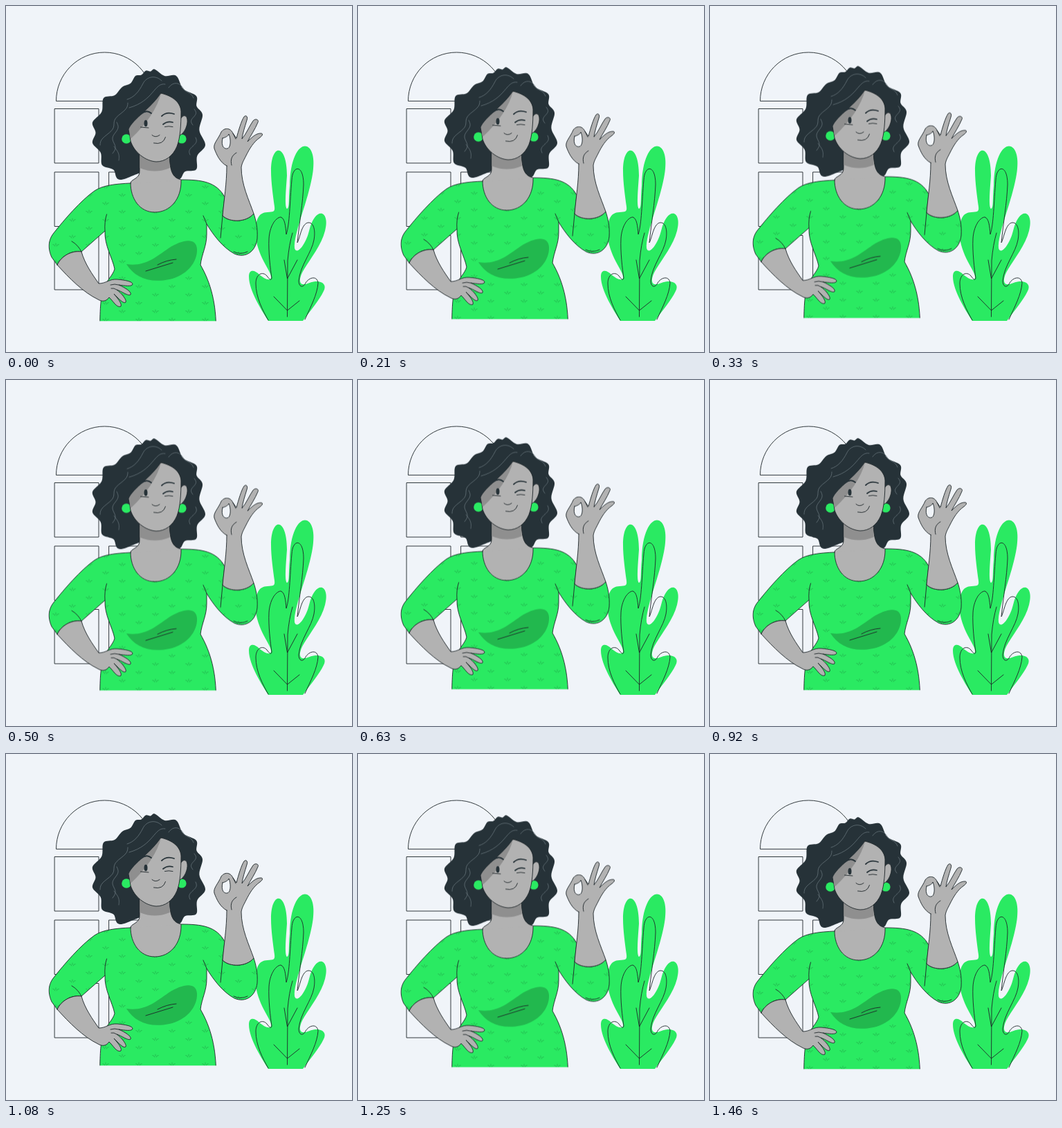
Write an HTML page that moves like this. It is 500 by 500 pixels and loops after 1.5 s.

```html
<!DOCTYPE html>
<html lang="en">
<head>
<meta charset="utf-8">
<title>Woman giving an OK sign</title>
<style>
  html, body { margin: 0; width: 100%; height: 100%; overflow: hidden; background: #f0f4f9; }
  svg { display: block; width: 100vw; height: 100vh; }
  .line, .edge { stroke: #1d2529; stroke-width: .9; stroke-linecap: round; stroke-linejoin: round; }
  .line, .strand, .brow { fill: none; }
  .skin { fill: #b2b2b2; }
  .shade { fill: #8f8f8f; }
  .green { fill: #2aea62; }
  .hair { fill: #263238; }
  .strand { stroke: #68757b; stroke-width: .8; stroke-linecap: round; }
  .brow { stroke: #263238; stroke-width: 1.8; stroke-linecap: round; }
</style>
</head>
<body>
<svg viewBox="0 0 500 500">
  <defs>
    <pattern id="sprigs" width="48" height="24" patternUnits="userSpaceOnUse">
      <path id="sprig" fill="none" stroke="#1fa648" stroke-width=".7" stroke-linecap="round"
        d="M19.800 8.500q2.500 0 3 2.500M28.200 8.500q-2.500 0-3 2.500M24 7v2.500"/>
      <use href="#sprig" x="-24" y="12"/>
      <use href="#sprig" x="24" y="12"/>
    </pattern>
    <clipPath id="hem"><path d="M0 0H500V455.300H0Z"/></clipPath>
    <path id="torso" d="M180 256C158 257 140 259 128 267C108 281 84 309 69 328C60 339 61 352 66 363L74 374
      C80 361 95 353 109 355L143 325C142 346 154 364 157 380C154 390 146 395 141 409C136 424 136 440 135.500 470
      H303.500C304 430 296 400 281 374C283 358 290 347 290 330V315C299 330 313 349 330 358C346 365 361 355 363 336
      C364 321 361 309 358 300C347 313 323 313 313 303L316 276C304 254 283 251 253 251C254 279 237 298 215 298
      C193 298 180 278 180 256Z"/>
  </defs>

  <g class="line" id="window"><path d="M72.500 137a70 70 0 0 1 140 0Z"/></g>

  <g id="plant">
    <path class="green" d="M379 455C371 442 351 412 351 391C351 380 359 381 366 388C373 394 381 398 383 393
      C385 385 365 365 361 335C359 309 365 298 378 298C386 297 389 298 388 290C386 275 383 255 383 238
      C383 198 406 198 406 245C405 262 402 290 406 293C410 292 408 280 410 260C411 188 449 188 444 235
      C442 258 431 290 425 310C421 323 416 340 417 350C420 361 433 345 438 325C447 288 469 295 461 325
      C456 345 440 365 431 380C424 391 423 400 428 402C436 403 440 398 448 398C460 398 463 405 459 412
      C453 425 440 440 429 455Z"/>
    <path class="line" d="M379 454C371 440 361 421 361 401C361 387 371 383 377 390C380 394 383 398 384 393
      C382 380 379 355 380 336C381 319 389 306 397 305C403 307 404 318 405 330C410 315 410 285 413 251
      C414 230 430 228 430 258C429 285 424 312 421 342C425 335 427 314 437 313C446 313 447 327 445 338
      C442 356 425 375 423 397C423 405 428 408 432 402C436 393 449 388 451 400C450 417 440 435 432 453"/>
    <path class="line" d="M406.500 449L407 368Q409 345 414 328M402 367L406.500 394L421 367M387 420L406.500 440L424 426"/>
  </g>

  <g id="woman">
    <path class="hair" id="mane"/>
    <g class="strand" id="strands">
      <path d="M225 108C216 99 203 102 198 112C192 124 185 132 175 135"/>
      <path d="M235 118C242 108 252 111 256 119C260 126 267 123 271 133"/>
      <path d="M230 113C214 110 214 137 178 147"/>
    </g>

    <path class="skin edge" d="M193 210V238C194 250 180 250 180 256L215 300L253 251C241 248 237 240 236 215"/>
    <path class="skin" d="M180 256C180 278 193 298 215 298S254 279 253 251Z"/>
    <path class="shade" d="M193.500 212V234Q215 243 236.500 234L235.500 214Z"/>
    <circle class="green" cx="174" cy="192" r="6.800"/>
    <circle class="green" cx="254" cy="192" r="6.600"/>
    <path class="skin edge" d="M251 166C254 157 261 156 262 164C263 172 258 184 251 187"/>
    <path class="skin edge" d="M224 126C241 130 252 139 253 152C253 171 252 190 247 203C241 217 230 225 217 225
      C201 224 185 211 180 195L177.500 178C185 162 209 149 224 126Z"/>
    <path class="shade" d="M224 126C219 147 203 171 180 192L177.500 178C185 162 209 149 224 126Z"/>
    <path class="brow" d="M195 156Q203 149 210 155M225 159Q232 152 243 156M227 171Q233 166 241 168"/>
    <ellipse class="hair" cx="202" cy="169.500" rx="2.500" ry="4.800"/>
    <path class="line" d="M194.500 175L206 176M229.500 174.500Q235 173 241 174.500M211 186.500Q216 191 222 186.500M213.500 198Q227 201 230.500 189.500"/>

    <g clip-path="url(#hem)">
      <use href="#torso" class="green"/>
      <use href="#torso" class="edge" fill="url(#sprigs)"/>
    </g>
    <path fill="#22b84e" d="M174 373C201 377 216 363 235 350C255 337 275 334 276 351C277 371 260 390 236 395
      C207 401 186 392 174 373Z"/>
    <path class="line" d="M202 383L241 371M219 374Q232 367 246 366M145.500 301Q142 312 143 325M95 340Q104 345 109 355M285 303L290 315M329 355Q339 360 349 355"/>

    <path class="skin edge" d="M74 374C80 361 95 353 109 355C114 373 125 388 134 401C145 401 149 394 161 395
      C172 396 183 398 183 402C182 406 171 404 163 403C172 407 182 413 180 417C177 420 167 412 160 410
      C167 415 175 425 173 428C170 431 163 423 156 416C161 422 168 430 166 434C160 437 154 425 149 421
      C144 428 138 427 133 424C112 414 91 393 74 374Z"/>
    <path class="line" d="M151 403Q157 401 163 403M152 408Q156 407 160 410"/>

    <path class="skin edge" d="M319 231C309 226 304 214 301 206C299 199 307 192 311 182C315 176 324 175 328 184L333 191
      C336 180 340 166 344 160C347 157 350 160 348 165C345 175 342 184 341 192C347 185 352 173 357 166
      C360 162 366 164 364 168C360 178 353 188 349 196C355 190 361 184 368 184C372 184 371 187 367 190
      C358 196 352 206 347 216C343 224 341 227 340 233C340 258 351 280 358 300C347 313 323 313 313 303
      C315 279 319 257 319 231Z"/>
    <path class="edge" fill="#f0f4f9" d="M313 191C317 190 321 188 322 185C325 192 325 203 321 205.500C316 208 310 203 313 191Z"/>
    <path class="line" d="M328 184L332 192M333 212C326 216 324 222 326 230M313 303L310 335"/>
  </g>
</svg>
<script>
  const find = id => document.getElementById(id);

  function add(parent, tag, attrs) {
    const el = document.createElementNS('http://www.w3.org/2000/svg', tag);
    for (const key in attrs) el.setAttribute(key, attrs[key]);
    find(parent).append(el);
  }

  // Closed curve passing smoothly through every point
  function smooth(points) {
    const n = points.length;
    const at = i => points[(i + n) % n];
    const handle = (i, dir) => [0, 1].map(k => at(i)[k] + dir * (at(i + 1)[k] - at(i - 1)[k]) / 6);
    return 'M' + at(0) + points.map((p, i) =>
      `C${handle(i, 1)} ${handle(i + 1, -1)} ${at(i + 1)}`).join('') + 'Z';
  }

  // Curls: a dip between neighbouring crests, as deep as they are far apart
  function curls(crests, depth) {
    return crests.flatMap(([x, y], i) => {
      const [u, v] = crests[(i + 1) % crests.length];
      return [[x, y], [(x + u) / 2 - depth * (v - y), (y + v) / 2 + depth * (u - x)]];
    });
  }

  // Wavy strand hanging from one point to another
  function strand(x, y, u, v, turns) {
    const steps = 24;
    const points = Array.from({ length: steps + 1 }, (_, i) => {
      const t = i / steps;
      return [x + (u - x) * t + 3 * Math.sin(t * turns * 2 * Math.PI), y + (v - y) * t];
    });
    add('strands', 'path', { d: 'M' + points.join('L') });
  }

  find('mane').setAttribute('d', smooth(curls([
    [215, 91.5], [246, 101], [275, 130], [284, 157], [288, 201], [275, 236], [247, 251], [165, 251],
    [139, 230], [125, 198], [125, 168], [141, 133], [168, 117], [187, 101], [202, 93.5]
  ], .15)));

  strand(176, 140, 136, 201, 2);
  strand(160, 168, 154, 213, 1.5);
  strand(156, 203, 163, 223, .5);
  strand(272, 149, 270, 172, 1);
  strand(274, 190, 266, 215, 1);

  for (const x of [70.5, 149])
    for (const y of [148.5, 240, 331.5])
      add('window', 'rect', { x, y, width: 63.5, height: 78.5 });

  // Steady rise and fall
  const low = 'translateY(.3px)', high = 'translateY(-9.7px)';
  find('woman').animate({ transform: [low, high, low] },
    { duration: 1500, delay: -21, iterations: Infinity, easing: 'linear' });
</script>
</body>
</html>
```
